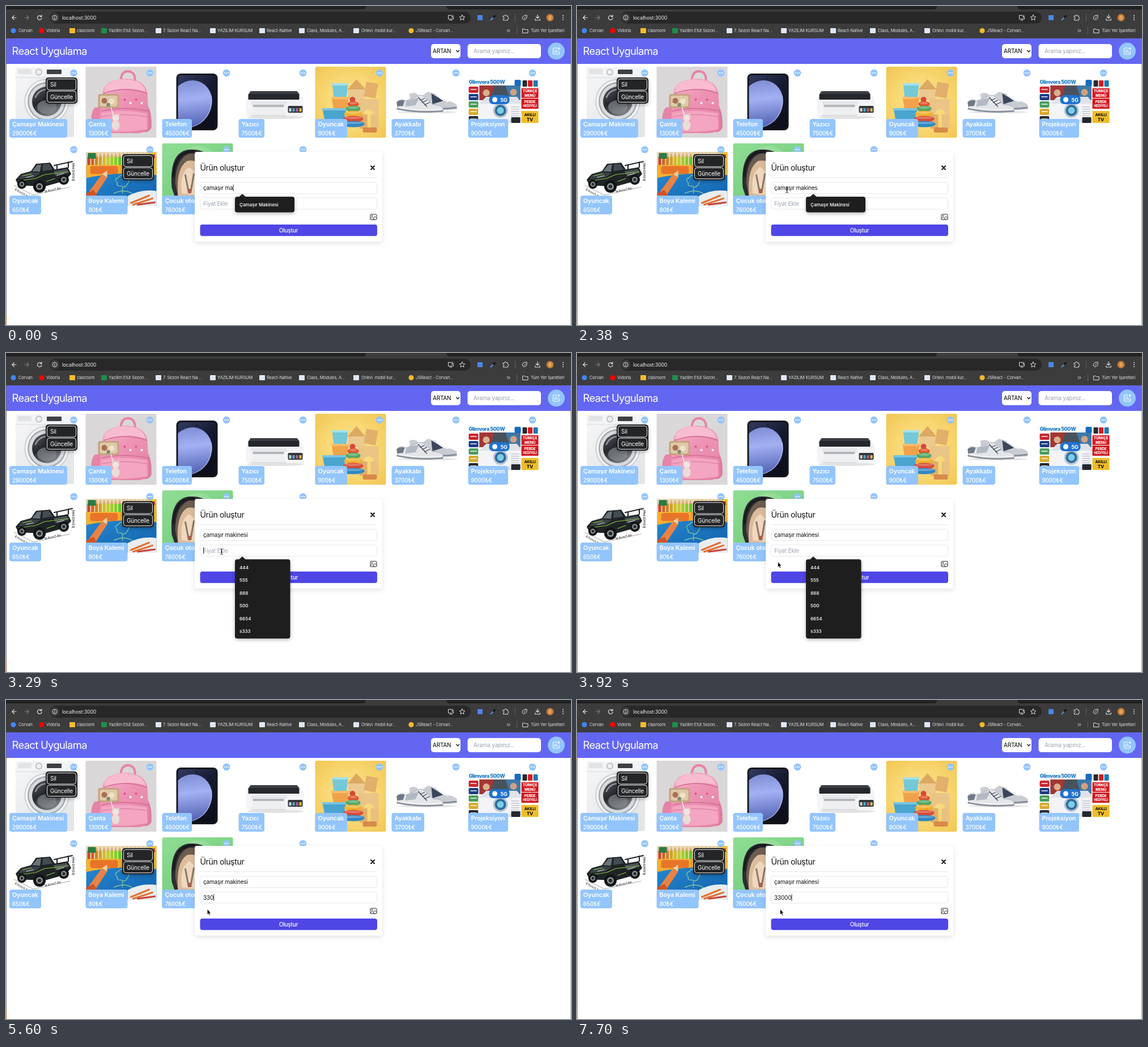
An HTML page that plays this animation: 997x562 px, repeating every 8 s.

```html
<!DOCTYPE html>
<html lang="tr">
<head>
<meta charset="utf-8">
<title>React Uygulama</title>
<style>
html, body { margin: 0; width: 100%; height: 100%; overflow: hidden; background: #fff; }
svg { display: block; width: 997px; height: 562px; }
text { font-family: Inter, Roboto, sans-serif; letter-spacing: -.02em; white-space: pre; }
.shade { filter: drop-shadow(0 2px 3px rgba(0,0,0,.3)); }
.panel { filter: drop-shadow(0 3px 4px rgba(0,0,0,.11)); }
</style>
</head>
<body>
<svg id="stage" viewBox="0 0 997 562" xmlns="http://www.w3.org/2000/svg"></svg>
<script>
const LOOP = 8000, STEP = 70;

const text = (x, y, s, size = 10, fill = '#000', weight = 400, more = '') =>
  `<text x="${x}" y="${y}" font-size="${size}" fill="${fill}" font-weight="${weight}" ${more}>${s}</text>`;
const rect = (x, y, w, h, fill, r = 0, more = '') =>
  `<rect x="${x}" y="${y}" width="${w}" height="${h}" rx="${r}" fill="${fill}" ${more}/>`;
const disc = (x, y, r, fill, more = '') =>
  `<circle cx="${x}" cy="${y}" r="${r}" fill="${fill}" ${more}/>`;
const oval = (x, y, a, b, fill, more = '') =>
  `<ellipse cx="${x}" cy="${y}" rx="${a}" ry="${b}" fill="${fill}" ${more}/>`;
const shape = (d, fill, more = '') => `<path d="${d}" fill="${fill}" ${more}/>`;
const line = (d, color, w = 1, more = '') =>
  `<path d="${d}" fill="none" stroke="${color}" stroke-width="${w}" stroke-linecap="round" stroke-linejoin="round" ${more}/>`;
const group = (x, y, body, more = '') => `<g transform="translate(${x} ${y})" ${more}>${body}</g>`;
const repeat = (n, f) => Array.from({ length: n }, (_, i) => f(i)).join('');
const stops = colors => colors.map((c, i) => `<stop offset="${i / (colors.length - 1)}" stop-color="${c}"/>`).join('');
const fade = (id, ...colors) => `<linearGradient id="${id}" x2=".6" y2="1">${stops(colors)}</linearGradient>`;
const glow = (id, ...colors) => `<radialGradient id="${id}" r=".72">${stops(colors)}</radialGradient>`;

const defs = '<defs>' +
  fade('steel', '#f7f7f8', '#e3e5e7') +
  fade('glass', '#5a5f65', '#25282c', '#7b8085') +
  fade('pink', '#f7b3cb', '#ee93b5', '#e584a8') +
  fade('screen', '#323a60', '#171b31', '#0d0f1a') +
  fade('planet', '#6f7fc8', '#a3b0f3', '#5565b5') +
  glow('sun', '#fbe59a', '#f8d873', '#f1c552') +
  fade('leaf', '#8fdd94', '#6fca79') +
  fade('sky', '#2b93d6', '#1567b4') +
  '<clipPath id="display"><rect x="28" y="15" width="67" height="94" rx="5"/></clipPath></defs>';

function browser() {
  const ink = '#dedfe0';
  const marks = [
    [8, 22, 'Corvan', '#4285f4'], [58, 71, 'Vidorla', '#f00'], [112, 125, 'clasroom', '#f5bb2c'],
    [168, 181, 'Yazilim Etüt Sezon...', '#1e8e4a'], [264, 277, '7. Sezon React Na...', '#dfe7f5'],
    [360, 373, 'YAZILIM KURSUM', '#dfe7f5'], [447, 460, 'React-Native', '#dfe7f5'],
    [517, 531, 'Class, Modules, A...', '#dfe7f5'], [613, 627, 'Orlevi. mobil kur...', '#dfe7f5'],
    [710, 723, 'JSReact - Corvan...', '#f2b82e']
  ];
  return rect(0, 0, 997, 57, '#3c3c3c') +
    shape('M0 0H635Q635 6 629 6H0ZM777 0H997V6H783Q777 6 777 0Z', '#202121') +
    rect(77, 10, 743, 21, '#282828', 10.5) + disc(86, 20.5, 8, '#3c3c3c') +
    line('M18 20.5H11M14.3 17L10.8 20.5L14.3 24', ink, 1.2) +
    line('M33 20.5H40M36.7 17L40.2 20.5L36.7 24', '#7a7a7a', 1.2) +
    line('M62.4 18.4A3.8 3.8 0 1 0 63 21.5M62.9 16.2V18.9H60.2', ink, 1.2) +
    line('M86 20.2V22.6M86 18.3V18.4', ink, 1.1) + disc(86, 20.5, 4, 'none', `stroke="${ink}"`) +
    text(99, 23.8, 'localhost:3000', 8.9, '#eee') +
    line('M786 16.5H780.5V23H789.5V20.5M783 25H787M788 16V20M786 18.3L788 20.2L790 18.3', ink) +
    line('M805 15.7L806.5 18.8L809.8 19.2L807.3 21.4L808 24.8L805 23L802 24.8L802.7 21.4L800.2 19.2L803.5 18.8Z', ink) +
    rect(832, 16, 9, 9, '#4a86e8', 1) +
    line('M855.5 24.5L860 20', '#5b8def', 2) + line('M860.5 19.5L862.5 17.5', '#111', 3) +
    line('M877.5 17.5H880Q880 15.4 881.5 15.4T883 17.5H885.5V20Q887 20.2 887 21.4T885.5 22.8V25H877.5V22.5Q879.2 22.2 879.2 21.2T877.5 20Z', ink) +
    rect(898, 14, 1, 13, '#5c6066') +
    line('M911.5 23Q909.5 16.5 919 16Q920.5 24.5 913 24.3M914 22L917 18.8', ink) +
    line('M938 15.5V21.5M935.3 19L938 21.7L940.7 19M933.8 22.5V25H942.2V22.5', ink, 1.2) +
    disc(960, 20.5, 6.5, '#c47a35') + oval(960, 20.5, 3, 4, '#e0a35b') +
    repeat(3, i => disc(983, 17 + i * 3.5, 1, ink)) +
    marks.map(([x, tx, name, c], i) =>
      (i < 2 || i == 9 ? disc(x + 5, 43.5, 4.6, c) : rect(x, 39, 10, 9, c, 1)) + text(tx, 46.3, name, 7.5, ink)).join('') +
    line('M884 41.3L886.2 43.5L884 45.7M887 41.3L889.2 43.5L887 45.7', ink) +
    rect(901, 37, 1, 13, '#5c6066') +
    line('M912 40.5H915.5L916.5 41.7H921V47.5H912Z', ink) +
    text(926, 46.3, 'Tüm Yer İşaretleri', 7.5, ink);
}

function header() {
  return rect(0, 57, 997, 45, '#6366f1') +
    text(10.5, 86, 'React Uygulama', 18.4, '#fff', 400, 'style="letter-spacing:-.65px"') +
    rect(750, 67, 52, 25, '#fff', 5) + text(753, 83.2, 'ARTAN') +
    line('M794.8 78.3L797.2 81L799.6 78.3', '#111', 1.3) +
    rect(814.5, 67, 129.5, 25, '#fff', 5) + text(825, 83.2, 'Arama yapınız...', 10, '#9ca3af') +
    disc(971, 79.5, 15, '#93c5fd') +
    line('M972 74H967Q965.5 74 965.5 75.5V83.5Q965.5 85 967 85H975Q976.5 85 976.5 83.5V80M968.5 82V78M971 82V76.5M973.5 82V80M975.5 72.8V77.2M973.3 75H977.7', '#fff', 1.1);
}

const art = {
  washer: () => rect(11, 1, 103, 123, 'url(#steel)', 3) + rect(11, 1, 103, 17, '#f3f4f5', 2) +
    rect(15, 4, 24, 9, '#e1e3e5', 1) + disc(52, 9.5, 6, '#b9bcc0') + disc(52, 9.5, 4.3, '#efeff0') +
    rect(66, 5, 26, 8, '#3c4045', 1) + line('M11 19H114', '#cfd1d4', .8) +
    disc(66, 61, 40, '#d3d5d8') + disc(66, 61, 37.5, '#f4f5f6') + disc(66, 61, 34, '#a5a9ae') +
    disc(66, 61, 31.5, '#d9dbde') + disc(66, 61, 26, 'url(#glass)') +
    line('M46 54Q52 40 68 40', '#b9bdc1', 2.5, 'opacity=".7"') + oval(66, 71, 17, 12, '#8c9196', 'opacity=".6"'),

  bag: () => rect(0, 0, 125, 125, '#dad7d8') +
    line('M62 26Q62 8 75 8Q89 9 87 28', '#e882a8', 4) +
    shape('M16 72Q7 82 11 112Q20 120 32 114V70Z', '#e583a8') + shape('M104 62Q118 74 116 108Q110 118 100 114Z', '#dd7aa0') +
    shape('M30 42Q36 22 72 21Q106 23 109 48L112 105Q109 117 90 117H36Q20 117 24 98Z', 'url(#pink)') +
    shape('M34 36Q50 20 74 23Q101 24 106 44Q72 32 34 47Z', '#f8bcd1') +
    line('M32 47Q69 33 108 47M28 78Q66 69 111 78', '#cf6d92', 1.5) +
    rect(22, 48, 37, 25, '#c4a37f', 4) + rect(25, 51, 31, 19, '#dfc9a8', 3) +
    disc(33, 60, 5, '#a86f50') + disc(46, 61, 5, '#f0e2cb') + rect(37, 64, 6, 6, '#7d8a72', 1) +
    shape('M28 82Q64 74 108 82L109 110Q68 118 28 112Z', '#f3a5c1') + line('M29 88Q66 81 108 88', '#d4759a', 1.2) +
    line('M45 72Q46 80 52 88', '#fff', 1.3) + disc(53, 90, 6, '#eee6e0') + disc(48.5, 85, 2.2, '#e4d3cb') +
    disc(57.5, 85, 2.2, '#e4d3cb') + oval(53, 103, 7, 9, '#e9ded7') +
    repeat(4, i => disc(69 + i * 10, 58 + i % 2 * 6, 2, i % 2 ? '#fff' : '#d95589')),

  phone: () => rect(25, 12, 73, 100, '#15171b', 8) + rect(28, 15, 67, 94, 'url(#screen)', 5) +
    '<g clip-path="url(#display)">' + oval(50, 65, 37, 42, 'url(#planet)', 'transform="rotate(28 50 65)"') +
    line('M50 107Q89 96 87 52', '#c3ccfb', 1.3, 'opacity=".7"') + '</g>' + disc(61, 20, 1.2, '#111'),

  printer: () => oval(65, 89, 50, 3, '#e2e2e2') + shape('M21 43H103L108 49H17Z', '#3a3d44') +
    shape('M16 48H109L115 57V84Q113 87 108 87H18Q13 86 13 80V57Z', '#f4f4f6') +
    rect(17, 48, 90, 10, '#24272c', 1) + rect(22, 61, 63, 6, '#e6e7ea', 1) + rect(25, 67, 55, 4, '#b3b6bb') +
    shape('M27 71H78L84 87H21Z', '#eeeff1') + line('M22 86H83', '#c6c9ce', 1) + rect(87, 69, 26, 12, '#33363a', 2) +
    repeat(4, i => rect(89 + i * 6, 73, 4, 6, ['#ccd1d6', '#48aeca', '#bd5c8b', '#d9ba4a'][i])),

  toys: () => rect(0, 0, 125, 125, 'url(#sun)', 3) +
    shape('M57 40L73 22L89 40Z', '#dda962') + rect(58, 40, 30, 19, '#ecc98f') +
    rect(88, 28, 21, 26, '#e2b06a', 0, 'transform="rotate(10 98 41)"') +
    shape('M76 57H112V84H104A9 9 0 0 0 86 84H76Z', '#ebc487') + rect(78, 84, 14, 25, '#dfae68') + rect(98, 84, 14, 25, '#e9c080') +
    shape('M30 30H58L55 56H33Z', '#74c8d8') + shape('M29 54H59L55 78H33Z', '#f0a24a') + shape('M13 74H55L50 101H18Z', '#4aa5cf') +
    rect(29, 29, 30, 4, '#a5e1e8', 2) + rect(28, 53, 32, 4, '#f8bd69', 2) + rect(12, 73, 44, 4, '#78c4e2', 2) +
    disc(66, 58, 5, '#d84835') +
    [[66, 10, '#e0532f'], [74, 13, '#55a865'], [83, 16, '#f0b02f'], [92, 18, '#d94a35'], [101, 20, '#2f86c4']]
      .map(([y, w, c]) => oval(67, y, w, 5.5, c) + oval(67, y - 2, w - 3, 2, '#fff', 'opacity=".25"')).join('') +
    rect(84, 107, 25, 9, '#d78a4a', 3),

  shoes: () => oval(63, 80, 53, 2, '#e2e2e2') +
    shape('M31 48Q39 44 45 48L50 54L64 44L78 48L89 60Q106 59 115 67V75Q82 79 35 72Z', '#c9cdd3') +
    line('M39 69Q76 77 114 72', '#7f8794', 2.5) + shape('M70 47L91 60L72 66Z', '#3b465c') +
    line('M79 50L99 62', '#f3f3f5', 2) +
    shape('M9 63Q14 55 25 60Q38 56 47 51Q54 48 60 55L73 67Q88 67 91 73L89 79Q48 83 11 75Z', '#e3e5e8', 'stroke="#9ba1ab" stroke-width=".8"') +
    line('M10 74Q47 82 90 78', '#868d98', 2.5) + line('M12 72Q47 78 89 75', '#f6f6f7', 1.5) +
    shape('M26 60L49 54L42 68L24 70Z', '#b3b9c2') + shape('M9 62Q15 57 23 60L20 69L10 70Z', '#6e7786') +
    line('M47 54L62 70M50 59L58 56M54 63L62 59M58 67L67 63', '#3a4254', 1.2),

  projector: () => {
    const tiles = ['#c9252d', '#1c3d84', '#4b9c5c', '#d9a92b', '#26292e'];
    return text(1, 30, 'Glimvora 500W', 9, '#1577c6', 800, 'style="letter-spacing:-.05em"') +
      tiles.map((c, i) => rect(1, 35 + i * 13, 17, 11, c, 2) + rect(4, 39 + i * 13, 11, 2, '#fff', 0, 'opacity=".7"')).join('') +
      rect(20, 33, 72, 26, '#48525e') + shape('M20 33H46L38 59H20Z', '#a33734') + shape('M66 33H92V59H74Z', '#3f79a8') +
      disc(80, 45, 6, '#d1a182') + disc(32, 46, 6, '#d9b08e') +
      shape('M18 66L32 53H86L95 64V93L89 99H24L18 92Z', '#dfe3e9') + rect(18, 65, 77, 28, '#f3f4f7', 3) +
      disc(57, 77, 13, '#bac4d2') + disc(57, 77, 10, '#2b6f9c') + disc(57, 77, 6, '#80cce6') +
      repeat(5, i => rect(76, 70 + i * 4, 14, 1.5, '#c3c8cf')) +
      rect(37, 50, 36, 16, '#1f72d1', 7) + text(57, 62, '5G', 9, '#fff', 700) + disc(47, 58, 4.5, '#fff') +
      rect(82, 23, 11, 11, '#176bc1', 2) + repeat(3, i => rect(96 + i * 9.5, 24, 8, 11, ['#26292e', '#d71920', '#1a79b8'][i], 1)) +
      rect(94, 38, 30, 17, '#d71920') + text(109, 45.3, 'TÜRKÇE', 6.4, '#fff', 800, 'text-anchor="middle"') +
      text(109, 52.8, 'MENÜ', 6.4, '#fff', 800, 'text-anchor="middle"') +
      rect(94, 56, 30, 18, '#cf151d') + text(109, 63.5, 'PERDE', 6.3, '#fff', 800, 'text-anchor="middle"') +
      text(109, 71, 'HEDİYELİ', 5.6, '#fff', 800, 'text-anchor="middle"') +
      rect(94, 78, 30, 21, '#efbd28') + text(109, 86.5, 'AKILLI', 6.5, '#111', 800, 'text-anchor="middle"') +
      text(109, 96, 'TV', 8, '#111', 800, 'text-anchor="middle"') + rect(76, 89, 16, 10, '#22282d', 1);
  },

  truck: () => shape('M11 64L20 54L38 49L47 36L72 34L80 46L103 42L109 54L98 66L62 76L16 74Z', '#1f2326') +
    shape('M40 49L49 38L56 37L54 50Z', '#69737a') + shape('M59 37L70 36L76 46L58 49Z', '#434c52') +
    shape('M20 56L38 51L55 52L44 60L17 63Z', '#3b4246') + shape('M78 49L102 45L104 52L82 58Z', '#4a5256') +
    line('M16 66L46 62L62 55L104 50M24 57L39 54M66 67L80 62', '#8cc63f', 1.2) + line('M30 60L42 57M84 56L96 53', '#e9ecec', .9) +
    line('M84 46V38M104 42V33M79 39L111 32', '#252a2e', 2.2) +
    [[22, 72, 8], [53, 76, 11], [96, 64, 9]].map(([x, y, r]) =>
      disc(x, y, r, '#121416') + disc(x, y, r * .55, '#8b9294') + disc(x, y, r * .3, '#24292b')).join('') +
    line('M8 74L42 91L107 77M112 35V65M109 35H115M109 65H115', '#666', .6) +
    text(9, 82, '8.5cm/3.3in', 5.2, '#333', 500, 'transform="rotate(30 9 82)"') +
    text(62, 87, '18.8cm/7.4in', 5.2, '#333', 500, 'transform="rotate(-13 62 87)"') +
    text(114.5, 66, '6.2cm/2.44in', 5, '#333', 500, 'transform="rotate(-90 114.5 66)"'),

  crayons: () => rect(1, 15, 124, 95, 'url(#sky)', 1) + rect(1, 15, 124, 24, '#ead9b4') +
    repeat(18, i => {
      const x = 3 + i * 6.8, c = `hsl(${(i * 11 + 10) % 360} 68% 48%)`;
      return rect(x, 24, 5, 15, c) + shape(`M${x} 24L${x + 2.5} 16L${x + 5} 24Z`, '#d8a873');
    }) +
    rect(4, 17, 14, 10, '#2b7a45', 1) + shape('M1 38H125V56Q60 48 1 61Z', '#f6b02f') +
    rect(8, 40, 49, 14, '#e8742a', 4) + rect(110, 15, 15, 40, '#f4c33b') + text(111, 26, '24', 9.5, '#c52d37', 800) +
    shape('M6 85L29 54L38 60L17 92H6Z', '#e98345') + shape('M29 54L38 48L38 60Z', '#f2cda0') + shape('M1 88L14 82L20 92H1Z', '#cf5426') +
    line('M56 70Q49 63 58 60Q63 52 71 60Q81 60 74 71Q70 80 62 75Q54 76 56 70M65 78V88M50 88Q67 80 82 88', '#7fc0a0', 1.4) +
    shape('M74 93Q98 80 125 84V110H74Z', '#e9edf0') +
    line('M80 105L112 92M84 108L118 97', '#e2702f', 3) + line('M92 108L122 104', '#c9463f', 3),

  seat: () => rect(0, 0, 125, 125, 'url(#leaf)', 3) + oval(63, 63, 46, 58, '#a9e6a8', 'opacity=".5"') +
    shape('M17 78Q12 16 46 11Q88 8 98 50V99H24Z', '#2b2d31') + shape('M23 70Q24 26 48 18Q78 16 90 52V94H28Z', '#6d5c50') +
    shape('M28 92Q24 44 44 31Q70 26 80 56V96Z', '#dcbb9c') + shape('M35 88Q30 54 47 42Q62 46 66 92Z', '#efd8be') +
    line('M20 58Q22 14 56 14', '#191b1e', 4) + line('M41 56L46 82M56 54L51 82', '#8c7767', 3) + rect(45, 80, 7, 8, '#a5614d', 2)
};

function card(i, row, draw, name, price, w) {
  return group(6 + 135 * i - (i ? .5 : 0), 107 + 135 * row, (draw ? draw() : '') +
    rect(0, 92, w, 33, '#93c5fd', 4) + text(5, 105.2, name, 10.8, '#fff', 600, 'style="letter-spacing:-.01em"') +
    text(5, 121.3, price, 10, '#fff', 500) + disc(113.5, 11, 6.3, '#93c5fd') +
    repeat(3, k => disc(110.5 + k * 3, 11, 1, '#fff')));
}

const menu = (x, y) => group(x, y, rect(0, 0, 56, 46, '#1f2022', 5) +
  [['Sil', 2.5], ['Güncelle', 24]].map(([s, top]) =>
    rect(2.5, top, 51, 19.5, '#242527', 4, 'stroke="#fff" stroke-width=".9"') + text(8, top + 13.6, s, 10, '#fff')).join(''), 'class="shade"');

function cards() {
  return card(0, 0, art.washer, 'Çamaşır Makinesi', '29000₺€', 102) +
    card(1, 0, art.bag, 'Çanta', '1300₺€', 45.5) +
    card(2, 0, art.phone, 'Telefon', '45000₺€', 52.5) +
    card(3, 0, art.printer, 'Yazıcı', '7500₺€', 45.5) +
    card(4, 0, art.toys, 'Oyuncak', '900₺€', 56.5) +
    card(5, 0, art.shoes, 'Ayakkabı', '3700₺€', 57.5) +
    card(6, 0, art.projector, 'Projeksiyon', '9000₺€', 70.5) +
    card(0, 1, art.truck, 'Oyuncak', '650₺€', 56) +
    card(1, 1, art.crayons, 'Boya Kalemi', '80₺€', 74) +
    card(2, 1, art.seat, 'Çocuk oto koltuğu', '7600₺€', 102) +
    card(3, 1, null, '', '', 46) + menu(70, 126) + menu(205, 261);
}

function modal() {
  const field = y => rect(342.5, y, 312, 20, '#fff', 4, 'stroke="#e5e7eb"');
  return rect(333, 257, 331, 158, '#fff', 4, 'class="panel"') +
    text(342.5, 290, 'Ürün oluştur', 14.06, '#111', 400, 'style="letter-spacing:-.025em"') +
    line('M644 282L650 288M650 282L644 288', '#000', 1.8) +
    rect(342.5, 302, 312.5, 1, '#e5e7eb') + field(310.5) + field(338) +
    rect(643, 367, 11, 9.5, 'none', 1.2, 'stroke="#222"') + disc(646, 369.8, 1, 'none', 'stroke="#222" stroke-width=".8"') +
    line('M643.3 375L646.3 372.4L648 374L651 370.7L653.7 373.5M648 374L650 376', '#222', .9) +
    rect(342.5, 385, 312.5, 20.3, '#4f46e5', 4) +
    text(498.5, 398.9, 'Oluştur', 10, '#fff', 500, 'text-anchor="middle"');
}

const stage = document.getElementById('stage');
stage.innerHTML = defs + rect(0, 0, 997, 562, '#fff') + browser() + header() + cards() +
  rect(0, 57, .8, 505, '#666') + rect(996.3, 57, .7, 505, '#888') + rect(0, 545, .8, 17, '#d97845') + modal() +
  text(348, 324.2, '', 10, '#111', 400, 'id="name"') + text(348, 351.7, '', 10, '#111', 400, 'id="price"') +
  rect(0, 0, .9, 11.5, '#111', 0, 'id="caret"') + '<g id="popup" class="shade"></g>' +
  disc(0, 0, 9.3, '#fff', 'id="ring" fill-opacity=".65" stroke="#0a0a0a" stroke-width="1.8"') +
  line('M-2 -5Q0 -5 0 -3.5Q0 -5 2 -5M0 -3.5V3.5M-2 5Q0 5 0 3.5Q0 5 2 5M-1 1H1', '#222', 1, 'id="beam"') +
  shape('M0 0V9.5L2.1 7.6L3.7 11L5.2 10.3L3.7 7H6.5Z', '#000', 'id="arrow" stroke="#fff" stroke-width=".6"');

const [nameBox, priceBox, caret, popup, ring, beam, arrow] =
  ['name', 'price', 'caret', 'popup', 'ring', 'beam', 'arrow'].map(id => document.getElementById(id));

const nameKeys = [[0, 10], [350, 11], [700, 12], [1120, 13], [1610, 14], [1820, 15], [2590, 16]];
const priceKeys = [[0, 0], [4270, 1], [4620, 2], [5600, 3], [6440, 4], [6580, 5]];
const hints = [
  [0, ['Çamaşır Makinesi']], [3290, ['444', '555', '888', '500', '6654', 's333']],
  [4270, ['3333', '333', '3000', '350']], [4620, ['3333', '333']], [5600, []]
];
const caretOn = [[0, 2380], [2590, 3080], [3290, 3780], [4270, 5110], [5600, 6090], [6440, 7070], [7560, LOOP]];
const mouseOn = [[2380, 4270], [5320, 5670], [6090, 6440], [7700, LOOP]];
const path = [
  [2380, 370.5, 324], [2800, 372, 332], [3150, 380.5, 350], [3500, 380.5, 350], [3780, 352, 363],
  [3920, 354.5, 368], [3990, 354.5, 368], [4130, 353.7, 368], [5320, 354.3, 368.6], [5530, 354.5, 368.6],
  [5600, 355.2, 368.6], [6020, 355.2, 368.6], [6440, 358.4, 368.6]
];

const latest = (keys, t) => keys.filter(k => k[0] <= t).pop()[1];
const within = (spans, t) => spans.some(([a, b]) => t >= a && t < b);
const show = (el, on) => el.setAttribute('visibility', on ? 'visible' : 'hidden');

function mouseAt(t) {
  const n = path.findIndex(p => p[0] > t);
  if (n === 0) return path[0].slice(1);
  if (n < 0) return path[path.length - 1].slice(1);
  const [a, b] = [path[n - 1], path[n]], k = (t - a[0]) / (b[0] - a[0]);
  return [a[1] + (b[1] - a[1]) * k, a[2] + (b[2] - a[2]) * k];
}

function popupBody(items, second) {
  if (!items.length) return '';
  const y = second ? 363.5 : 336, w = second ? 97.5 : 105, h = second ? 4.5 + 22.5 * items.length : 27.5;
  return rect(404, y, w, h, '#1e1e1e', 4) + shape(`M411 ${y + .5}L417 ${y - 5}L423 ${y + .5}Z`, '#1e1e1e') +
    items.map((s, i) => text(412, y + 17.1 + 22.5 * i, s, 8, '#ededed', 600, 'style="letter-spacing:0"')).join('');
}

let shown = null;
function draw(now) {
  const t = Math.floor(now % LOOP / STEP) * STEP;
  const price = '33000'.slice(0, latest(priceKeys, t)), second = t >= 3290;
  nameBox.textContent = 'çamaşır makinesi'.slice(0, latest(nameKeys, t));
  priceBox.textContent = price || 'Fiyat Ekle';
  priceBox.setAttribute('fill', price ? '#111' : '#9ca3af');

  const end = second ? (price ? priceBox.getComputedTextLength() : 0) : nameBox.getComputedTextLength();
  caret.setAttribute('x', 348.2 + end);
  caret.setAttribute('y', second ? 342.3 : 314.8);
  show(caret, within(caretOn, t));

  const items = latest(hints, t);
  if (items !== shown) popup.innerHTML = popupBody(shown = items, second);

  const [x, y] = mouseAt(t), on = within(mouseOn, t);
  for (const el of [ring, beam, arrow]) el.setAttribute('transform', `translate(${x} ${y})`);
  show(ring, t >= 3220 && t < 3290);
  show(beam, on && y < 359);
  show(arrow, on && y >= 359);
}

const start = performance.now();
function tick() {
  draw(performance.now() - start);
  requestAnimationFrame(tick);
}
tick();
</script>
</body>
</html>
```
